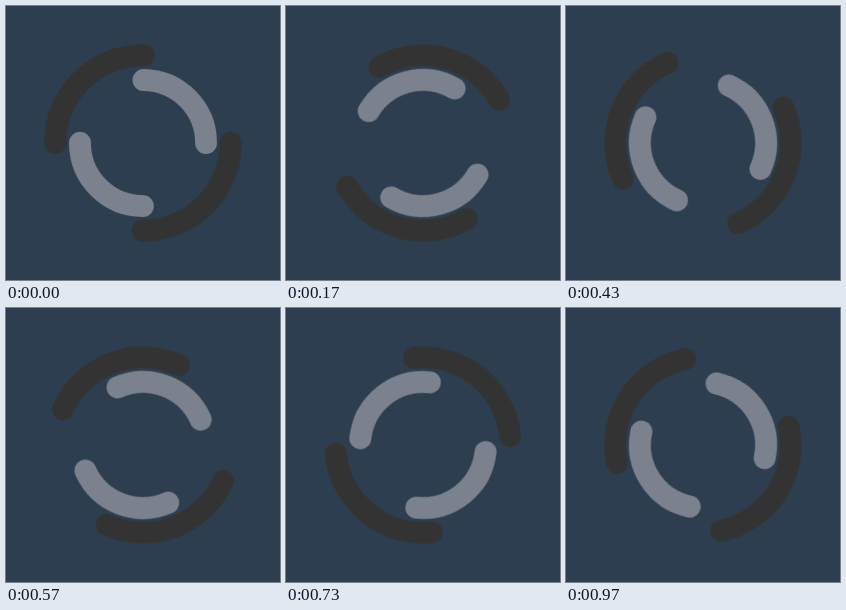
An HTML page for the animation above (1000 ms loop, 274 px wide and 274 px high).

```html
<!DOCTYPE html>
<html lang="en">
<head>
<meta charset="utf-8">
<title>Double ring spinner</title>
<style>
  html, body {
    margin: 0;
    width: 100%;
    height: 100%;
    overflow: hidden;
    background: #2c3e50;
  }
  svg {
    display: block;
    width: 100%;
    height: 100%;
  }
  circle {
    fill: none;
    stroke-width: 8;
    stroke-linecap: round;
    transform-origin: 50px 50px;
    /* 30 poses per second; the small lead settles each pose on a 10 ms tick */
    animation: spin 1s steps(30) -4ms infinite;
  }
  .outer {
    stroke: #333;
    stroke-dasharray: 50.265;
  }
  .inner {
    stroke: #7c828d;
    stroke-dasharray: 36.128;
    stroke-dashoffset: 36.128;
    animation-direction: normal;
    animation-name: unspin;
  }
  @keyframes spin {
    from { transform: rotate(0deg); }
    to { transform: rotate(360deg); }
  }
  @keyframes unspin {
    from { transform: rotate(0deg); }
    to { transform: rotate(-360deg); }
  }
</style>
</head>
<body>
<svg viewBox="0 0 100 100">
  <circle class="outer" cx="50" cy="50" r="32"/>
  <circle class="inner" cx="50" cy="50" r="23"/>
</svg>
</body>
</html>
```
